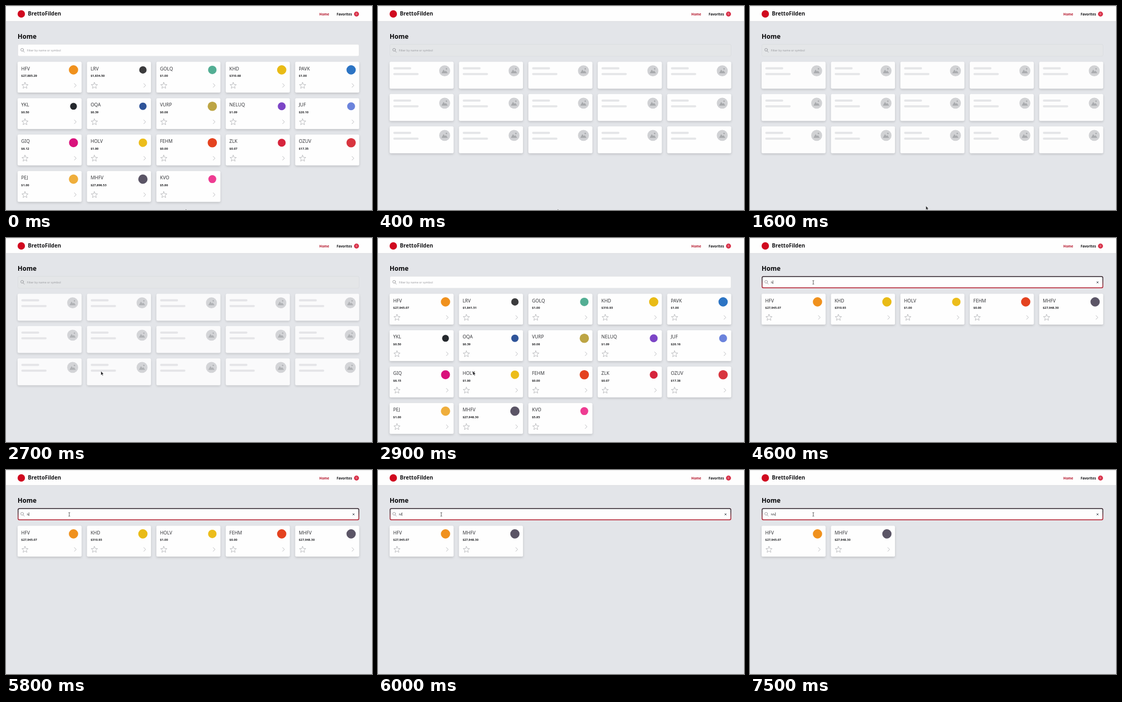
Recreate the animation shown at these times as an HTML page. Size 694 px wide and 386 px high, loop 8000 ms.

```html
<!DOCTYPE html>
<html lang="en">
<head>
<meta charset="utf-8">
<title>Coin list</title>
<style>
  html, body { margin: 0; width: 100%; height: 100%; overflow: hidden; background: #e3e5e9; }
  svg { display: block; width: 694px; height: 386px; font-family: "Noto Sans", "Open Sans", sans-serif; }
  .bold { font-weight: 700; }
  .line { fill: none; stroke: #b4b5b8; stroke-width: .9; stroke-linejoin: round; stroke-linecap: round; }
</style>
</head>
<body>
<svg viewBox="0 0 694 386">
  <defs>
    <filter id="shadow" x="-10%" y="-20%" width="120%" height="150%">
      <feDropShadow dx="0" dy="2" stdDeviation="2" flood-opacity=".17"/>
    </filter>
    <linearGradient id="ring" x2="0" y2="1">
      <stop offset=".25" stop-color="#25222a"/>
      <stop offset="1" stop-color="#b01a2c"/>
    </linearGradient>
  </defs>
  <rect width="694" height="386" fill="#e3e5e9"/>
  <rect width="694" height="29.5" fill="#d6d8dc"/>
  <rect width="694" height="28.7" fill="#fefefe"/>
  <rect width="694" height="1.5" fill="#eeeeee"/>
  <circle cx="29" cy="15" r="7" fill="#d0091f"/>
  <g class="bold" fill="#141417">
    <text x="41.5" y="18.4" font-size="10.1">BrettoFilden</text>
    <text x="594" y="17.5" font-size="6.4" fill="#b5182d">Home</text>
    <text x="627" y="17.5" font-size="6.3">Favorites</text>
    <text x="22" y="62" font-size="12.2" fill="#08080a">Home</text>
  </g>
  <circle cx="664.6" cy="15.2" r="4.7" fill="#d82f47"/>
  <text x="664.6" y="16.9" font-size="4.6" fill="#fff" text-anchor="middle">0</text>
  <g id="search"></g>
  <g id="grid"></g>
  <g id="pointer"></g>
</svg>
<script>
const LOOP = 8000, LOADING = 400, LOADED = 2900, FOCUS = 3200, BLINK = 600;
const typing = [[4600, "h"], [6000, "hf"], [7500, "hfv"]];
const pointerPath = [[1500, 340.5, 384], [2300, 180, 252], [2900, 180, 252], [3200, 120, 84]];

// symbol, first price, refreshed price, icon colour, icon radius
const coins = [
  ["HFV", "27,885.29", "27,945.07", "#f0911d", 8.8],
  ["LRV", "1,834.50", "1,841.51", "#3b3b3d", 7],
  ["GOLQ", "1.00", "1.00", "#53ae94", 8],
  ["KHD", "310.68", "310.93", "#e9bb16", 8.8],
  ["PAVK", "1.00", "1.00", "#2c74c4", 8.8],
  ["YKL", "0.50", "0.50", "#24282d", 6.5],
  ["OQA", "0.39", "0.39", "#2f5499", 7],
  ["VURP", "0.08", "0.08", "#bda544", 8.8],
  ["NELUQ", "1.09", "1.09", "#7c45c6", 7.5],
  ["JUF", "20.10", "20.16", "#6b83dc", 7.5],
  ["GIQ", "6.12", "6.15", "#d9127c", 8.5],
  ["HOLV", "1.00", "1.00", "#ecbd1b", 8],
  ["FEHM", "0.00", "0.00", "#e4421f", 8.8],
  ["ZLK", "0.07", "0.07", "#d6243c", 7.5],
  ["OZUV", "17.35", "17.38", "#d8353f", 8.8],
  ["PEJ", "1.00", "1.00", "#efae3c", 8.8],
  ["MHFV", "27,896.53", "27,948.30", "#5b5566", 8.8],
  ["KVO", "5.86", "5.85", "#ee3c92", 7.5]
];

const starPath = Array.from({ length: 10 }, (_, i) => {
  const radius = i % 2 ? 2.8 : 6.3, angle = (i / 5 - .5) * Math.PI;
  return `${i ? "L" : "M"}${14 + radius * Math.cos(angle)} ${45.2 + radius * Math.sin(angle)}`;
}).join("") + "Z";

const cell = (i, pitch, content) =>
  `<g transform="translate(${22 + i % 5 * 131.6} ${105.5 + Math.floor(i / 5) * pitch})">${content}</g>`;

const panel = height => `<rect width="121.3" height="${height}" rx="2.5" fill="#fefefe" filter="url(#shadow)"/>`;

const coinCard = ([symbol, before, after, color, radius], i, refreshed) => cell(i, 68.9, `
  ${panel(58.3)}
  <text x="6.8" y="16" font-size="8.8" fill="#35363a">${symbol}</text>
  <text class="bold" x="6.8" y="28.6" font-size="5.85" fill="#202124">$${refreshed ? after : before}</text>
  <circle cx="106" cy="15.4" r="${radius}" fill="${color}"/>
  <path class="line" d="${starPath}"/>
  <path class="line" d="M107.7 41.2l3.4 3.6l-3.4 3.6"/>`);

const skeletonCard = (_, i) => cell(i, 61.1, `
  ${panel(50.7)}
  <rect x="7" y="10.3" width="34" height="4.2" rx="2.1" fill="#e5e6e8"/>
  <rect x="7" y="21.2" width="48" height="4" rx="2" fill="#e5e6e8"/>
  <circle cx="104.4" cy="17.2" r="10.4" fill="#d0d1d4"/>
  <path d="M98.3 21.8L102.3 14.8L105 18.4L106.8 16.8L110.3 21.8Z" fill="#a7a9ac"/>
  <circle cx="107.8" cy="13.5" r="1.4" fill="#a7a9ac"/>`);

function searchField(loading, focused, text, caretOn) {
  const color = text ? "#303136" : "#9b9ca0";
  const box = focused
    ? `<rect x="21.7" y="71.7" width="648.6" height="23.8" rx="3.5" fill="#e9c9ce"/>
       <rect x="23" y="73" width="646" height="21.2" rx="2.5" fill="#fefefe" stroke="url(#ring)" stroke-width="1.4"/>`
    : `<rect x="22.5" y="72.5" width="647" height="22.5" rx="2.5" fill="${loading ? "#e4e6e8" : "#fefefe"}"
        stroke="${loading ? "#dadcdf" : "#e0e1e4"}" stroke-width=".8"/>`;
  return `${box}
    <path class="line" style="stroke:#909196" d="M32.4 85l2.4 2.4M33.2 82.8a2.6 2.6 0 1 1-5.2 0a2.6 2.6 0 1 1 5.2 0"/>
    <text x="39.5" y="85.6" font-size="5.55" fill="${color}">${text || "Filter by name or symbol"}</text>
    ${caretOn ? `<rect x="${39.6 + textWidth(text)}" y="80.3" width=".7" height="6.6" fill="#222"/>` : ""}
    ${text ? `<path d="M657.3 82.2l3.4 3.4m0-3.4l-3.4 3.4" stroke="#38404a"/>` : ""}`;
}

const measure = document.createElement("canvas").getContext("2d");
measure.font = '55.5px "Noto Sans", "Open Sans", sans-serif';
const textWidth = text => measure.measureText(text).width / 10;

const arrow = `<path d="M0 0V7.6L1.8 6L3 8.7L4.2 8.1L3 5.5H5.3Z" fill="#202024" stroke="#fff" stroke-width=".5"/>`;
const beam = `<path d="M-1.5-3.5Q0-3.5 0-2.7Q0-3.5 1.5-3.5M0-2.8V2.8M-1.5 3.5Q0 3.5 0 2.7Q0 3.5 1.5 3.5"
  fill="none" stroke="#333" stroke-width=".8"/>`;

function pointerAt(t) {
  const next = pointerPath.findIndex(([time]) => time > t);
  if (next === 0) return pointerPath[0].slice(1);
  if (next < 0) return pointerPath.at(-1).slice(1);
  const [t0, x0, y0] = pointerPath[next - 1], [t1, x1, y1] = pointerPath[next];
  const u = (t - t0) / (t1 - t0), eased = u * u * (3 - 2 * u);
  return [x0 + (x1 - x0) * eased, y0 + (y1 - y0) * eased];
}

const [search, grid, pointer] = ["search", "grid", "pointer"].map(id => document.getElementById(id));

function update(element, markup) {
  if (element.markup !== markup) element.innerHTML = element.markup = markup;
}

function render(t) {
  const loading = t >= LOADING && t < LOADED;
  const focused = t >= FOCUS;
  const [typedAt, text] = typing.findLast(([time]) => t >= time) || [FOCUS, ""];
  const caretOn = focused && Math.floor((t - typedAt) / BLINK) % 2 === 0;
  update(search, searchField(loading, focused, text, caretOn));

  const cards = loading
    ? Array.from({ length: 15 }, skeletonCard)
    : coins.filter(([symbol]) => symbol.toLowerCase().includes(text))
        .map((coin, i) => coinCard(coin, i, t >= LOADED));
  update(grid, cards.join(""));
  const fade = Math.min(1, Math.max(0, (t - 1200) / 1500));
  grid.setAttribute("opacity", loading ? 1 - .15 * fade : 1);

  const [x, y] = pointerAt(t);
  update(pointer, y < 95 ? beam : arrow);
  pointer.setAttribute("transform", `translate(${x} ${y})`);
}

const start = performance.now();
function frame() {
  render((performance.now() - start) % LOOP);
  requestAnimationFrame(frame);
}
frame();
</script>
</body>
</html>
```
